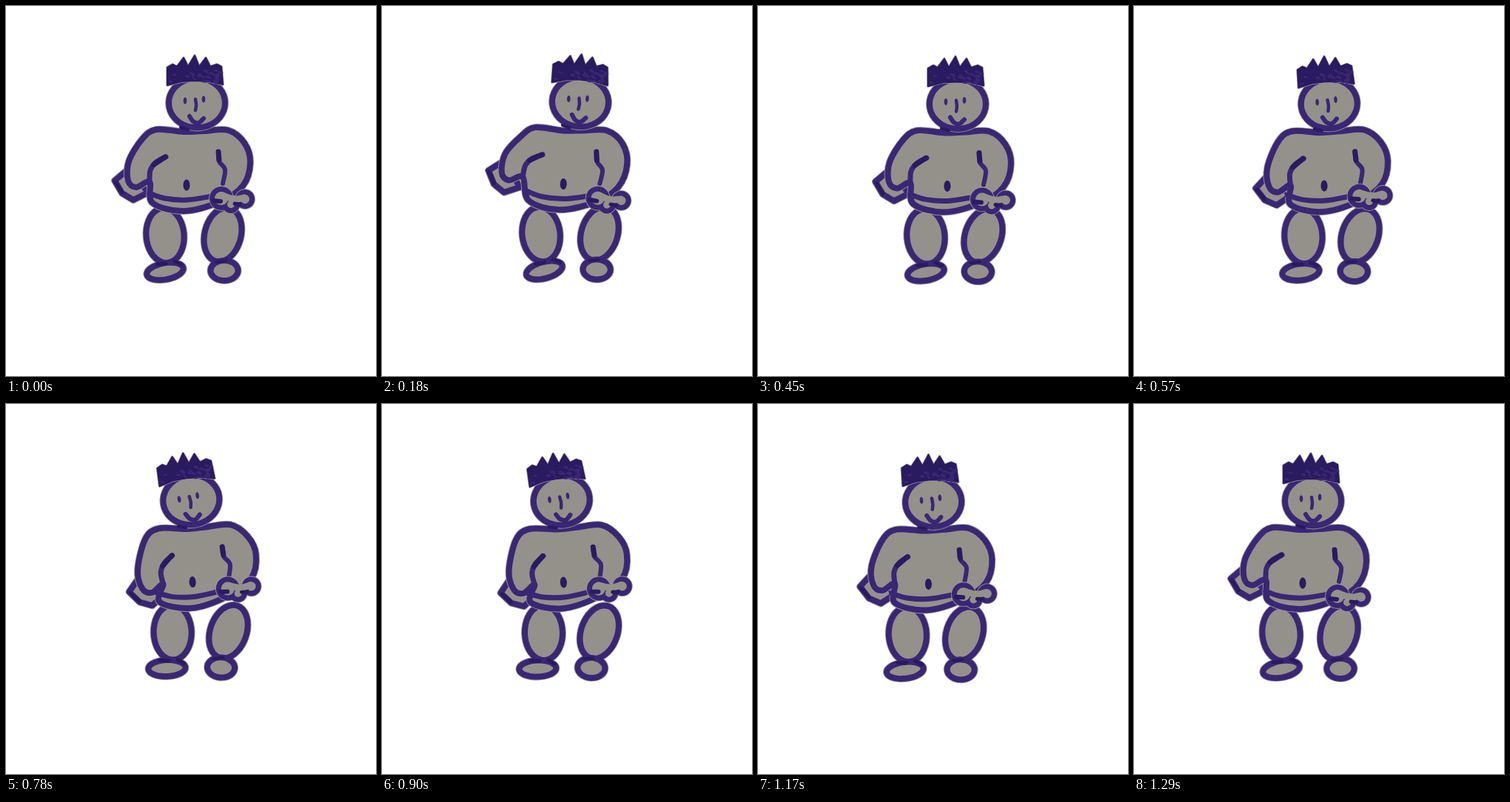
Write an HTML page with a canvas that moves like this. It is 500x500 px and loops after 8.12 s.

```html
<!DOCTYPE html>
<html lang="en">
<head>
<meta charset="utf-8">
<title>Swaying doll</title>
<style>
html, body { margin: 0; width: 100%; height: 100%; overflow: hidden; background: #fff; }
canvas { display: block; width: 100%; height: 100%; }
</style>
</head>
<body>
<canvas id="stage" width="500" height="500"></canvas>
<script>
const ctx = document.getElementById('stage').getContext('2d');
const LOOP = 8120, STEP = 30, END = 1290;
const INK = '#392774', DARK = '#2a1a60', SKIN = '#94918b', FRINGE = '#98959b';
const { PI, sin, cos, min, max, sqrt } = Math;

let rig;

function ramp(t, from, to) {
  const u = max(0, min(1, (t - from) / (to - from)));
  return u * u * (3 - 2 * u);
}

// Every part follows four motions: sway sideways, lean, bob and the dragging foot.
function pose(t) {
  const sway = 13 * ramp(t, 100, 530) - 29 * ramp(t, 600, END);
  const lean = t < 450 ? 0.075 * sin(PI * t / 450) : -0.135 * sin(PI * (t - 450) / (END - 450));
  const bob = -1.5 * sin(4 * PI * t / END);
  const drag = sqrt(min(1, t / 1050)) - ramp(t, 1050, END);
  const part = (px, py, turn, dx = sway, dy = bob, on) => ({ px, py, dx, dy, on, c: cos(turn), s: sin(turn) });
  return {
    head: part(257, 165, lean, sway + 90 * lean),
    torso: part(244, 242, lean / 2),
    armL: part(220, 190, 1.6 * lean, 0, 0, 'torso'),
    armR: part(300, 180, 0.45 * lean, 0, 0, 'torso'),
    handR: part(306, 261, 0.5 * lean, 0, 55 * min(lean, 0), 'torso'),
    legL: part(214, 312, -0.45 * lean, sway - 15 * lean),
    footL: part(215, 359, -1.1 * lean, sway + 45 * lean),
    legR: part(292, 312, 0.1 * drag, sway - drag),
    footR: part(295, 357, 0.06 * drag, sway - 14.5 * drag)
  };
}

function place(name, x, y) {
  const p = rig[name], rx = x - p.px, ry = y - p.py;
  const qx = p.px + rx * p.c - ry * p.s + p.dx;
  const qy = p.py + rx * p.s + ry * p.c + p.dy;
  return p.on ? place(p.on, qx, qy) : [qx, qy];
}

function points(name, ...xy) {
  const out = [];
  for (let i = 0; i < xy.length; i += 2) out.push(place(name, xy[i], xy[i + 1]));
  return out;
}

function polygon(pts) {
  const path = new Path2D();
  pts.forEach(p => path.lineTo(...p));
  path.closePath();
  return path;
}

function curve(pts, closed) {
  const path = new Path2D(), n = pts.length;
  const get = i => closed ? pts[(i + n) % n] : pts[max(0, min(n - 1, i))];
  path.moveTo(...pts[0]);
  for (let i = 0; i < (closed ? n : n - 1); i++) {
    const [a, b, c, d] = [-1, 0, 1, 2].map(k => get(i + k));
    path.bezierCurveTo(b[0] + (c[0] - a[0]) / 6, b[1] + (c[1] - a[1]) / 6,
      c[0] - (d[0] - b[0]) / 6, c[1] - (d[1] - b[1]) / 6, c[0], c[1]);
  }
  if (closed) path.closePath();
  return path;
}

function ellipse(name, x, y, rx, ry, tilt = 0) {
  const pts = [];
  for (let a = 0; a < 2 * PI - 0.01; a += PI / 10) {
    const u = rx * cos(a), v = ry * sin(a);
    pts.push(place(name, x + u * cos(tilt) - v * sin(tilt), y + u * sin(tilt) + v * cos(tilt)));
  }
  return curve(pts, true);
}

function stroke(path, color, width) {
  ctx.strokeStyle = color;
  ctx.lineWidth = width;
  ctx.stroke(path);
}

function fill(path, color) {
  ctx.fillStyle = color;
  ctx.fill(path);
}

// Shapes in one group share a single cut-out edge.
function shapes(...paths) {
  for (const p of paths) stroke(p, FRINGE, 9.8);
  for (const p of paths) {
    fill(p, SKIN);
    stroke(p, INK, 8);
  }
}

const line = (color, width, name, ...xy) => stroke(curve(points(name, ...xy)), color, width);

function drawLegs() {
  shapes(
    ellipse('legL', 215, 310, 25.5, 37, -0.08),
    ellipse('legR', 293, 309, 24.5, 37, 0.25),
    ellipse('footL', 215, 358.5, 25, 11, -0.18),
    ellipse('footR', 295, 357.5, 18.5, 13.5)
  );
  line(DARK, 5, 'footL', 204, 349, 216, 348);
  line(DARK, 5, 'footL', 228, 345, 237, 349);
  line(DARK, 4, 'footR', 284, 346, 297, 344);
}

function drawBody() {
  shapes(polygon(points('armL', 167, 219, 147, 236, 157, 253, 172, 262, 192, 252)));
  line(DARK, 5, 'armL', 148, 238, 157, 252);
  shapes(curve([
    ...points('torso', 240, 170, 203, 167, 184, 180),
    ...points('armL', 166, 210, 165, 236, 176, 245, 194, 238),
    ...points('torso', 198, 266, 240, 277, 290, 264),
    ...points('armR', 320, 243, 330, 212),
    ...points('torso', 322, 185, 300, 168, 268, 169)
  ], true));
  line(INK, 7, 'armL', 216, 204, 203, 211, 195, 222, 194, 238);
  line(DARK, 7, 'armL', 215, 204, 200, 214);
  line(INK, 6, 'torso', 287, 197, 288, 210, 296, 221, 293, 240);
  line(DARK, 7, 'torso', 287, 197, 288, 208);
  line(INK, 7, 'torso', 194, 253, 215, 260, 245, 262, 279, 257);
  fill(ellipse('torso', 244, 242, 4.5, 7.5), DARK);
}

function drawHand() {
  const lobes = (grow, color) => {
    for (const [x, y, r] of [[291, 260, 16], [304, 268, 12], [323, 261, 13]])
      fill(ellipse('handR', x, y, r + grow, r + grow), color);
  };
  lobes(0.9, FRINGE);
  lobes(0, INK);
  lobes(-7, SKIN);
  line(SKIN, 9, 'handR', 295, 257, 309, 261, 322, 259);
  line(DARK, 6, 'handR', 281, 263, 290, 264);
  line(DARK, 5, 'handR', 309, 267, 316, 268);
}

function drawHair() {
  const tips = [218, 107, 218, 83];
  for (let i = 0; i < 5; i++) {
    const x = 225 + 15 * i;
    tips.push(x, 67 + 3 * (i - 2) ** 2, x + 6, 82);
  }
  const crown = polygon(points('head', ...tips, 293, 106, 275, 102, 255, 101, 237, 102));
  stroke(crown, FRINGE, 3.5);
  fill(crown, DARK);
  stroke(crown, DARK, 2);
  let seed = 7;
  const random = () => (seed = seed * 16807 % 2147483647) / 2147483647;
  for (let i = 0; i < 26; i++) {
    const x = 221 + 68 * random(), y = 86 + 17 * random();
    line(INK, 2 + 2 * random(), 'head', x, y, x + 3, y + 3 * random());
  }
}

function drawHead() {
  shapes(ellipse('head', 258, 131, 38, 33.5));
  line(DARK, 4, 'head', 236, 164, 246, 167);
  drawHair();
  for (const [x, y] of [[242, 128], [267, 126]]) fill(ellipse('head', x, y, 2.3, 4.5), INK);
  line(INK, 4.5, 'head', 256, 126, 257, 134, 256, 141);
  line(INK, 6, 'head', 248, 149, 253, 156, 260, 158, 267, 152);
}

function draw(t) {
  rig = pose(t);
  ctx.fillStyle = '#fff';
  ctx.fillRect(0, 0, 500, 500);
  ctx.lineCap = ctx.lineJoin = 'round';
  drawLegs();
  drawBody();
  drawHand();
  drawHead();
}

function tick() {
  const t = (performance.now() - start) % LOOP;
  draw(min(END, Math.floor(t / STEP) * STEP));
  requestAnimationFrame(tick);
}

const start = performance.now();
tick();
</script>
</body>
</html>
```
